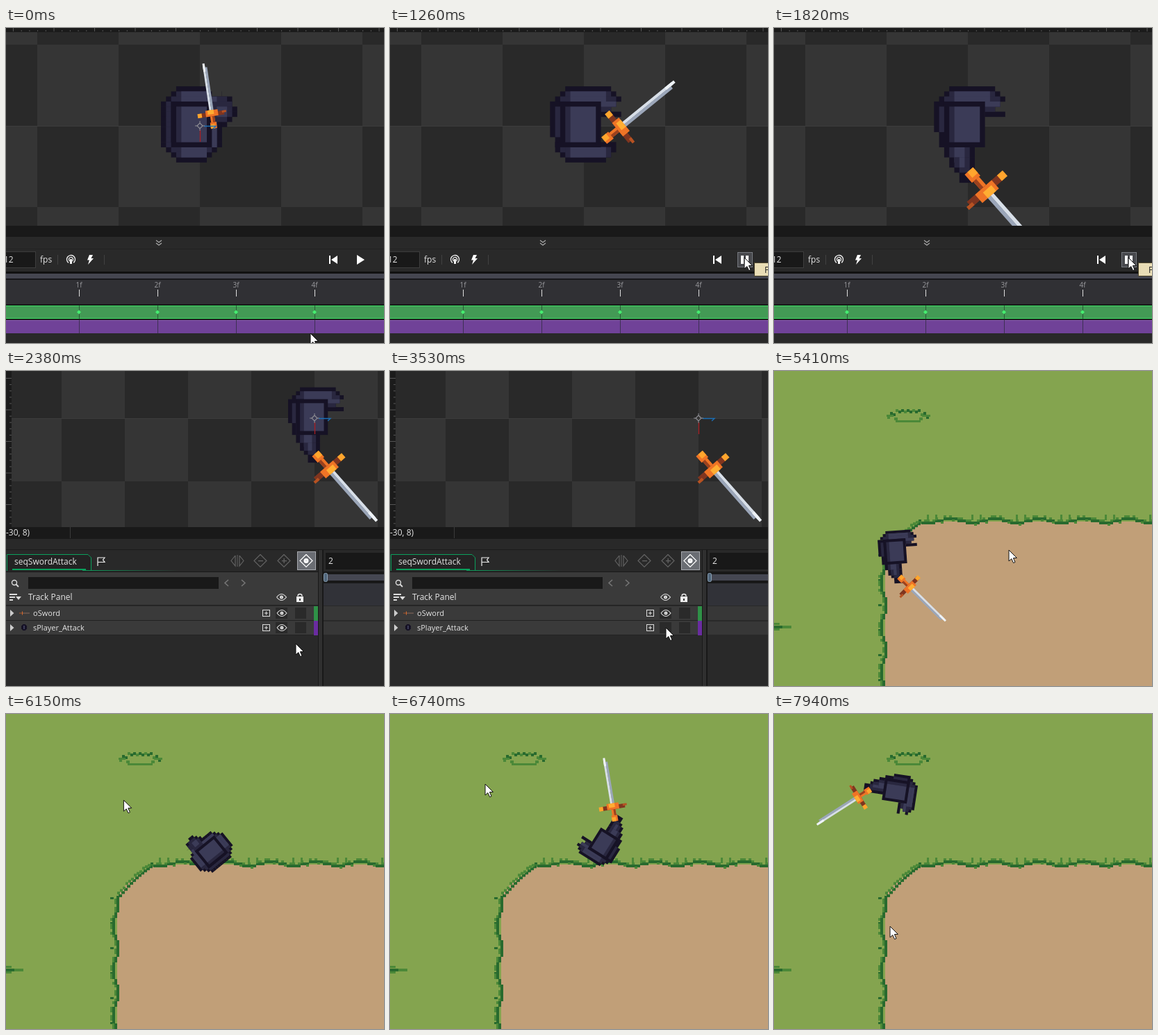
An HTML page with a canvas for the animation above (7.99 s loop, 544x454 px).

```html
<!DOCTYPE html>
<html lang="en">
<head>
<meta charset="utf-8">
<title>Sword attack sequence</title>
<style>
html, body { margin: 0; width: 100%; height: 100%; overflow: hidden; background: #282828; }
canvas { display: block; width: 100vw; height: 100vh; }
</style>
</head>
<body>
<canvas id="stage" width="544" height="454"></canvas>
<script>
const LOOP = 7990, EDITOR_END = 1960, TRACKS_END = 4580, STEP = 1000 / 12;
const g = document.getElementById('stage').getContext('2d');
const DARK = '#161225', MID = '#29273f', LIGHT = '#3b3b57';
const SANS = '"Open Sans", "Noto Sans", sans-serif';

function box(color, x, y, w, h) {
  g.fillStyle = color;
  g.fillRect(x, y, w, h);
}

function shape(color, points, stroke, width = 1) {
  g.beginPath();
  points.forEach(([x, y]) => g.lineTo(x, y));
  if (color) { g.closePath(); g.fillStyle = color; g.fill(); }
  if (stroke) { g.strokeStyle = stroke; g.lineWidth = width; g.stroke(); }
}

function ring(color, x, y, r, width = 1, from = 0, to = Math.PI * 2) {
  g.beginPath();
  g.arc(x, y, r, from, to);
  g.strokeStyle = color;
  g.lineWidth = width;
  g.stroke();
}

function text(value, x, y, color = '#e4e4e4', size = 12, align = 'left') {
  g.font = `${size}px ${SANS}`;
  g.textAlign = align;
  g.fillStyle = color;
  g.fillText(value, x, y);
}

function diamond(color, x, y, r, filled = true) {
  const points = [[x, y - r], [x + r, y], [x, y + r], [x - r, y], [x, y - r]];
  shape(filled && color, points, !filled && color, 1.2);
}

// Eased values between keys of the form [time, ...values].
function track(t, keys) {
  const next = keys.findIndex(k => k[0] > t);
  if (next === 0) return keys[0].slice(1);
  if (next < 0) return keys[keys.length - 1].slice(1);
  const a = keys[next - 1], b = keys[next], p = (t - a[0]) / (b[0] - a[0]);
  const e = p * p * (3 - 2 * p);
  return a.slice(1).map((v, i) => v + (b[i + 1] - v) * e);
}

function cursor([x, y]) {
  const arrow = [[0, 0], [0, 16], [3.8, 12.6], [6.6, 18.6], [9, 17.5], [6.4, 11.6], [11.4, 11.4], [0, 0]];
  shape('#fff', arrow.map(([a, b]) => [x + a, y + b]), '#111');
}

function px(color, x, y, w, h) {
  box(color, x, y, w + .04, h + .04);
}

// A block whose first and last rows are cut in by the given steps.
function chunk(color, x, y, w, h, top = [], bottom = top) {
  for (let row = 0; row < h; row++) {
    const inset = Math.max(top[row] || 0, bottom[h - 1 - row] || 0);
    px(color, x + inset, y + row, w - 2 * inset, 1);
  }
}

function pack(x, y, w, h) {
  px(DARK, x - 1, y - 1, w + 2, h + 2);
  px(MID, x, y, 1, h);
  px(LIGHT, x + 1, y, w - 1, h);
}

function readyBody() {
  chunk(DARK, 9, 1, 6, 7, [3, 1, 1], [2, 1]);
  chunk(DARK, 0, 0, 12, 15, [3, 2, 1]);
  chunk(MID, 1, 1, 10, 13, [2, 1]);
  chunk(LIGHT, 4, 1, 5, 13);
  chunk(MID, 10, 2, 4, 5, [1], [1]);
  px(LIGHT, 9, 2, 2, 1);
  px(LIGHT, 11, 4, 2, 2);
  px(LIGHT, 10, 7, 1, 5);
  px(DARK, 2, 3, 1, 8);
  pack(3, 4, 6, 7);
}

function raisedArm() {
  chunk(DARK, 1, 0, 15, 5, [3, 2, 1]);
  px(DARK, 11, 5, 4, 1);
  chunk(MID, 2, 1, 13, 4, [2, 1]);
  chunk(LIGHT, 4, 1, 9, 2, [1]);
  px(LIGHT, 11, 3, 3, 1);
}

function swingBody() {
  raisedArm();
  px(DARK, 1, 3, 3, 7);
  px(DARK, 2, 10, 3, 2);
  chunk(DARK, 2, 11, 12, 4, [], [2, 1]);
  px(MID, 2, 4, 1, 6);
  px(MID, 3, 11, 2, 2);
  px(MID, 4, 12, 9, 2);
  px(LIGHT, 5, 12, 7, 2);
  pack(4, 4, 6, 7);
}

function followBody() {
  raisedArm();
  px(DARK, 1, 3, 4, 6);
  px(DARK, 2, 9, 7, 3);
  px(DARK, 3, 12, 6, 2);
  px(DARK, 4, 14, 5, 2);
  px(DARK, 5, 16, 4, 1);
  px(DARK, 6, 17, 3, 2);
  px(MID, 2, 4, 1, 5);
  px(MID, 3, 9, 1, 3);
  px(MID, 4, 12, 4, 2);
  px(LIGHT, 5, 12, 2, 3);
  px(MID, 5, 14, 3, 2);
  px(LIGHT, 6, 14, 1, 2);
  px(MID, 6, 16, 2, 1);
  pack(4, 4, 6, 7);
}

const POSES = [
  { body: readyBody, x: 2.8, y: .5, turn: -98.5, size: .405 },
  { body: swingBody, x: 4, y: 2.9, turn: -39.2, size: .565 },
  { body: followBody, x: .2, y: 8.9, turn: 48.6, size: .72 }
];

function sword({ x, y, turn, size }) {
  g.save();
  g.translate(x, y);
  g.rotate(turn * Math.PI / 180);
  g.scale(size, size);
  px('#d8dfe8', 8, -1, 23, 1);
  px('#9ba6b9', 8, 0, 22, 1);
  px('#eef2f6', 28, -1, 4, 1);
  px('#ef7426', 0, -1.5, 3, 3);
  px('#ffa52d', 0, -1.5, 2, 2);
  px('#ef7426', 3, -1, 4, 2);
  px('#9b421f', 3, 0, 3, 1);
  px('#80351f', 6, -6, 2, 12);
  px('#ef7426', 6, -3, 3, 6);
  px('#ffad32', 7, -2, 2, 3);
  px('#ffa52d', 6, -7, 2, 2);
  px('#b65222', 7, 5, 1, 2);
  g.restore();
}

function player(x, y, unit, pose, turn = 0, body = true, armed = true) {
  g.save();
  g.translate(x, y);
  g.rotate(turn * Math.PI / 180);
  g.scale(unit, unit);
  g.save();
  g.translate(-7.67, -7.8);
  if (body) pose.body();
  g.restore();
  if (armed) sword(pose);
  g.restore();
}

function checker(ox, oy, cell, bottom) {
  g.save();
  g.beginPath();
  g.rect(0, 0, 544, bottom);
  g.clip();
  for (let i = -5; i < 4; i++) for (let j = -2; j < 3; j++) {
    box((i + j) % 2 ? '#353535' : '#292929', ox + i * cell, oy + j * cell, cell, cell);
  }
  box('#3c3c3c', 0, oy, 544, 1);
  g.restore();
}

function origin(x, y) {
  shape(null, [[x + .5, y + 6], [x + .5, y + 23]], '#a91e22', 1.3);
  shape(null, [[x + 6, y + .5], [x + 23, y + .5], [x + 19, y + 4]], '#1b70b8', 1.3);
  diamond('#8d8d93', x, y, 4, false);
  for (const s of [-1, 1]) {
    shape(null, [[x + 3 * s, y], [x + 7 * s, y]], '#8d8d93');
    shape(null, [[x, y + 3 * s], [x, y + 7 * s]], '#8d8d93');
  }
}

function editor(t) {
  const playing = t >= 1010, hover = t >= 740;
  const step = t < 1100 ? 0 : Math.floor((t - 1100) / STEP) % 6;
  checker(279, 141, 117, 285);
  box('#1b1b1b', 0, 0, 544, 6);
  for (let i = 0; i < 47; i++) box('#555', 10 + i * 11.7, i % 5 ? 3 : 0, 1, i % 5 ? 2 : 5);
  player(279, 141, 7.3, POSES[Math.min(step, 2)]);
  if (!playing) origin(279, 141);

  box('#191919', 0, 285, 544, 16);
  box('#292929', 0, 301, 544, 153);
  box('#222', 0, 318, 544, 1);
  for (const y of [306, 310]) shape(null, [[216, y], [220, y + 3], [224, y]], '#aaa', 1.2);
  box('#191919', -5, 322, 47, 24);
  g.strokeStyle = '#3d3d3d';
  g.lineWidth = 1;
  g.strokeRect(-5.5, 322.5, 48, 23);
  text('12', -3, 338);
  text('fps', 49, 338);
  box('#414141', 74, 327, 1, 14);
  box('#414141', 141, 327, 1, 14);
  ring('#eee', 93.5, 333.5, 6, 1.4, 2.2, 7.2);
  ring('#eee', 93.5, 333.5, 3, 1.3, 2.2, 7.2);
  box('#eee', 92, 333, 3, 7);
  shape('#fff', [[120, 327], [125, 327], [122.5, 332], [126, 332], [118, 341], [120, 334.5], [117, 334.5]]);
  box('#fff', 465, 328, 2, 12);
  shape('#fff', [[477, 328], [477, 340], [468, 334]]);
  if (hover) {
    box('#48494d', 500, 323, 22, 22);
    g.strokeStyle = '#777a80';
    g.lineWidth = 1;
    g.strokeRect(500.5, 323.5, 21, 21);
  }
  if (playing) {
    box('#fff', 505, 328, 4, 12);
    box('#fff', 512, 328, 4, 12);
  } else shape('#fff', [[505, 327], [516, 334], [505, 341]]);

  box('#111', 0, 351, 544, 3);
  box('#454650', 0, 354, 544, 8);
  box('#17171a', 0, 361, 544, 2);
  box('#303034', 0, 363, 544, 35);
  box('#18191a', 0, 398, 544, 2);
  box('#439a55', 0, 400, 544, 19);
  box('#39dd62', 0, 400, 544, 1);
  box('#39dd62', 0, 418, 544, 1);
  box('#1c1c1c', 0, 419, 544, 2);
  box('#704298', 0, 421, 544, 19);
  box('#8958b0', 0, 421, 544, 1);
  for (let i = 1; i < 5; i++) {
    const x = i * 113 - 8;
    text(i + 'f', x, 374, '#9a9a9e', 10, 'center');
    box('#ddd', x, 377, 1, 10);
    box('rgba(20,35,28,.55)', x, 400, 1, 40);
    diamond('#45ee70', x, 409.5, 3);
  }
  if (t >= 1190) {
    box('#e9ddb5', 525, 338, 40, 20);
    g.strokeStyle = '#51492f';
    g.lineWidth = 1;
    g.strokeRect(524.5, 338.5, 40, 19);
    text('Play', 539, 353, '#222');
  }
  cursor(track(t, [[50, 438, 440], [840, 510, 331]]));
}

function eye(x, y) {
  g.beginPath();
  g.moveTo(x - 7, y);
  g.quadraticCurveTo(x, y - 9, x + 7, y);
  g.quadraticCurveTo(x, y + 9, x - 7, y);
  g.strokeStyle = '#ddd';
  g.lineWidth = 1.2;
  g.stroke();
  ring('#ddd', x, y, 1.5, 2);
}

function trackRow(name, y, color, visible) {
  box('#3a3a3a', 0, y - 10, 443, 20);
  box('#222', 0, y + 10, 443, 1);
  shape('#ccc', [[6, y - 5], [11.5, y], [6, y + 5]]);
  text(name, 39, y + 3.5, '#e4e4e4', 11);
  g.strokeStyle = '#ddd';
  g.lineWidth = 1;
  g.strokeRect(369.5, y - 4.5, 10, 9);
  box('#ddd', 372, y - .5, 5, 1);
  box('#ddd', 374, y - 2.5, 1, 5);
  box('#2a2a2a', 388, y - 8, 17, 16);
  box('#2a2a2a', 416, y - 8, 16, 16);
  if (visible) eye(397, y);
  box(color, 443, y - 10, 6, 21);
}

function trackPanel(t) {
  const shown = t < 3000;
  checker(444, 68, 91, 225);
  box('#1b1b1b', 0, 0, 8, 225);
  for (let i = 0; i < 25; i++) box('#555', i % 5 ? 5 : 0, 10 + i * 9.1, i % 5 ? 3 : 8, 1);
  player(444, 68, 5.7, POSES[2], 0, shown);
  origin(444, 68);

  box('#191919', 0, 225, 544, 17);
  box('#3a3a3a', 92, 225, 1, 16);
  text('-30, 8)', 0, 237);
  box('#292929', 0, 242, 544, 212);
  box('#1b1b1b', 0, 257, 544, 1);
  const fade = g.createLinearGradient(110, 0, 248, 0);
  fade.addColorStop(0, '#0aa05c');
  fade.addColorStop(1, '#292929');
  box(fade, 110, 287, 138, 1);
  shape('#232323', [[1.5, 288], [1.5, 264.5], [118, 264.5], [122.5, 269], [122.5, 287]]);
  shape(null, [[1.5, 288], [1.5, 264.5], [118, 264.5], [122.5, 269], [122.5, 287]], '#0aa05c');
  box('#0aa05c', 9, 285, 106, 2);
  text('seqSwordAttack', 12, 279);
  shape(null, [[132, 281], [132, 269], [142, 269], [139.5, 272.2], [142, 275.5], [132, 275.5]], '#eee', 1.2);
  for (const x of [366, 400]) {
    diamond('#626262', x, 273.5, 9, false);
    box('#626262', x - 3, 273, 7, 1.3);
  }
  box('#626262', 399.5, 270, 1.3, 7);
  shape(null, [[330, 266], [324, 273.5], [330, 281], [330, 266]], '#626262', 1.2);
  shape(null, [[336, 266], [342, 273.5], [336, 281], [336, 266]], '#626262', 1.2);
  box('#626262', 332.5, 265, 1, 17);
  box('#6a6d73', 419, 260, 27, 27);
  g.strokeStyle = '#a6a9ae';
  g.lineWidth = 1;
  g.strokeRect(419.5, 260.5, 26, 26);
  diamond('#fff', 432, 273.5, 9, false);
  ring('#fff', 432, 273.5, 2, 3);

  box('#3a3a3a', 0, 290, 449, 48);
  box('#181818', 0, 289, 449, 1);
  box('#191919', 32, 297, 274, 17);
  ring('#ddd', 12, 305, 3.5, 1.4);
  shape(null, [[14.5, 307.5], [18, 311]], '#ddd', 1.8);
  shape(null, [[320, 301], [315, 305.5], [320, 310]], '#777', 1.5);
  shape(null, [[339, 301], [344, 305.5], [339, 310]], '#777', 1.5);
  [11, 8, 5].forEach((w, i) => box('#ddd', 5, 321 + i * 4, w, 2));
  shape('#ddd', [[14, 325], [22, 325], [18, 330]]);
  text('Track Panel', 32, 330);
  eye(396.5, 326);
  box('#eee', 418, 325, 10, 8);
  ring('#eee', 423, 324.5, 3, 1.5, Math.PI, 0);
  box('#3a3a3a', 422, 328, 2, 3);
  box('#222', 0, 337, 449, 1);
  trackRow('oSword', 349, '#2f9147', true);
  trackRow('sPlayer_Attack', 370, '#6a2ca0', shown);
  box('#aa552d', 19, 348.5, 4, 1);
  box('#d76a2b', 23, 346.5, 1, 5);
  box('#8a6b5c', 24, 348.5, 10, 1);
  chunk(DARK, 22, 365, 8, 9, [2, 1]);
  box(LIGHT, 25, 367, 2, 5);

  box('#191919', 449, 258, 8, 196);
  box('#303030', 450, 258, 5, 196);
  box('#292929', 457, 258, 87, 196);
  box('#181818', 460, 262, 84, 24);
  text('2', 464, 278);
  box('#181818', 457, 289, 87, 17);
  box('#454752', 460, 293, 84, 9);
  g.beginPath();
  g.roundRect(457.5, 291.5, 5, 12, 2);
  g.fillStyle = '#51677c';
  g.fill();
  g.strokeStyle = '#8ba0b3';
  g.lineWidth = 1;
  g.stroke();
  box('#313238', 457, 306, 87, 32);
  box('#373737', 457, 339, 87, 20);
  box('#373737', 457, 361, 87, 19);
  cursor(track(t, [[1960, 470, 350], [2340, 417, 393], [2660, 417, 393], [2940, 397, 370],
    [3530, 397, 370], [3630, 398, 371], [3910, 398, 371], [4430, 396, 402]]));
}

const LEAF = '#286a2e', BLADE = '#4b8838', GRASS = '#84a44f';

function bush(x, y) {
  const w = 60;
  for (let i = 0; i < w; i += 4) {
    const rise = Math.round(Math.sin((i + 2) / w * Math.PI) * 2.4) * 4;
    box(i % 12 ? LEAF : BLADE, x + i, y + 8 - rise + (i % 8 ? 0 : 2), 4, 4);
  }
  box(BLADE, x - 1, y + 8, 10, 3);
  box(BLADE, x + 50, y + 8, 12, 3);
  box(BLADE, x + 10, y + 12, 5, 4);
  box(BLADE, x + 46, y + 12, 5, 4);
  box(BLADE, x + 12, y + 16, 36, 3);
}

function meadow() {
  box(GRASS, 0, 0, 544, 454);
  shape('#c19f78', [[160, 454], [160, 264], [165, 254], [176, 243], [205, 222], [216, 217], [544, 217], [544, 454]]);
  bush(163, 55);
  box(BLADE, 0, 363, 8, 3);
  box(LEAF, 0, 367, 14, 4);
  box(BLADE, 12, 367, 13, 4);
  box(BLADE, 0, 371, 8, 3);
  for (let x = 208, i = 0; x < 544; x += 4, i++) {
    const y = 214 + Math.round(Math.cos((x - 252) / 64 * Math.PI * 2) * -1.1) * 3;
    box(GRASS, x, 212, 4, y - 211);
    box(LEAF, x, y, 4, 4);
    if (i % 3 !== 1) box(BLADE, x, y + (i % 4 ? -3 : 3), 4, 3);
    if (i % 16 === 6 || i % 16 === 3) box(BLADE, x, 207, 3, 8);
  }
  for (let y = 262, i = 0; y < 454; y += 4, i++) {
    const x = 156 + Math.round(Math.cos((y - 336) / 64 * Math.PI * 2) * 1.1) * 3;
    box(GRASS, 156, y, x - 155, 4);
    box(LEAF, x, y, 4, 4);
    if (i % 3) box(BLADE, x - 3, y, 3, 4);
    if (i % 9 === 0) box(LEAF, 150, y + 2, 5, 3);
  }
  for (let i = 0; i < 12; i++) {
    const x = 162 + i * 4, y = 260 - i * 3.8 - Math.sin(i / 11 * Math.PI) * 3;
    box(LEAF, x, y, 5, 4);
    box(BLADE, x - 2, y - 4 + (i % 3), 4, 4);
  }
}

function game(t) {
  meadow();
  const [x, y] = track(t, [[5560, 177, 261], [6300, 306, 185], [7250, 306, 185], [7740, 174, 113]]);
  const [turn] = track(t, [[4580, 8], [5200, -4], [5540, -4], [6330, -148], [7200, -148], [7740, -261.3]]);
  const start = [5200, 6530, 7730].find(s => t >= s && t < s + 285);
  const armed = start !== undefined;
  const pose = POSES[armed ? Math.min(2, Math.floor((t - start) / STEP)) : 0];
  player(x, y, 4, pose, turn, true, armed);
  cursor(track(t, [[4680, 482, 290], [5300, 338, 258], [5540, 338, 258], [6330, 144, 104],
    [6600, 137, 101], [7250, 137, 101], [7900, 167, 306]]));
}

function frame(now) {
  const t = now % LOOP;
  if (t < EDITOR_END) editor(t);
  else if (t < TRACKS_END) trackPanel(t);
  else game(t);
  requestAnimationFrame(frame);
}
requestAnimationFrame(frame);
</script>
</body>
</html>
```
